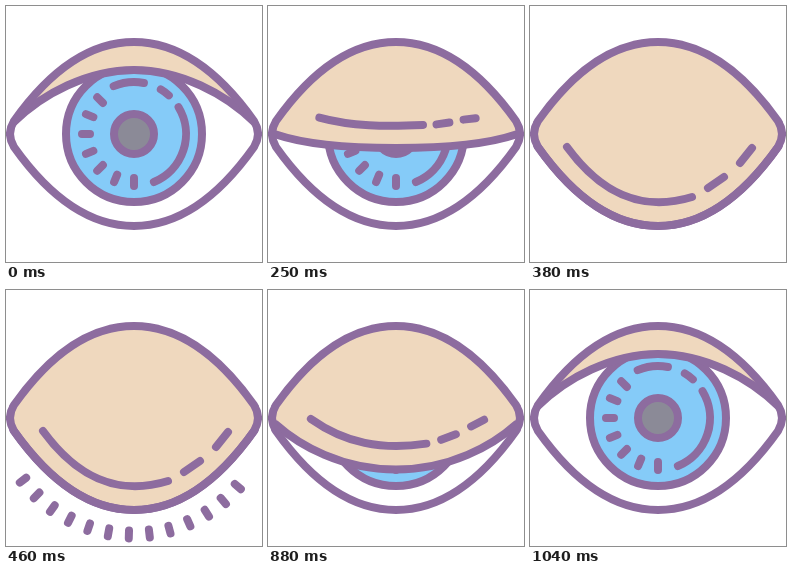
These frames come from a looping animation (256 px wide and 256 px high, 1180 ms). An HTML page:

```html
<!DOCTYPE html>
<html lang="en">
<head>
<meta charset="utf-8">
<title>Blinking eye</title>
<style>
html, body { margin: 0; width: 100%; height: 100%; overflow: hidden; background: #fff; }
svg { display: block; width: 100vw; height: 100vh; }
.line { fill: none; stroke: #8d6c9f; stroke-width: 8; stroke-linecap: round; stroke-linejoin: round; }
</style>
</head>
<body>
<svg viewBox="0 0 256 256">
  <circle class="line" cx="128" cy="128" r="68" style="fill:#85cbf8"/>
  <circle class="line" cx="128" cy="128" r="20" style="fill:#8b8a97"/>
  <path class="line" id="iris"/>
  <path id="lid" fill="#efd8be"/>
  <path class="line" id="rim"/>
  <path class="line" id="crease"/>
  <path class="line" id="outline"/>
  <path class="line" id="lashes"/>
</svg>
<script>
const LOOP = 1180;
const TICK = 1000 / 24;
const CLOSED = 6;     // step with the lid fully down
const LASHED = 8;     // step with the lashes fully out

const draw = (id, d) => document.getElementById(id).setAttribute('d', d);
const lerp = (a, b, k) => a + (b - a) * k;
const smooth = k => k * k * (3 - 2 * k);
const clamp = (v, lo, hi) => Math.max(lo, Math.min(hi, v));

const polar = (cx, cy, r, deg) => {
  const a = deg * Math.PI / 180;
  return [cx + r * Math.cos(a), cy + r * Math.sin(a)];
};
const spoke = (cx, cy, r0, r1, deg) =>
  `M${polar(cx, cy, r0, deg)}L${polar(cx, cy, r1, deg)}`;
const arc = (from, to) =>
  `M${polar(128, 128, 52, from)}A52 52 0 0 1 ${polar(128, 128, 52, to)}`;

// Left half of a curve, mirrored to the right: end, two controls, middle
const mirror = ([x, y]) => [256 - x, y];
const span = ([end, c1, c2, mid]) =>
  `${end}C${c1} ${c2} ${mid}C${mirror(c2)} ${mirror(c1)} ${mirror(end)}`;

const BOTTOM = [[8, 141], [30, 172], [71, 220], [128, 220]];
const TOP = BOTTOM.map(([x, y]) => [x, 256 - y]);

function drawIris() {
  let marks = arc(-113, -79) + arc(-59, -48) + arc(-31, 67.5);
  for (let deg = 90; deg <= 225; deg += 22.5) marks += spoke(128, 128, 44, 52, deg);
  draw('iris', marks);
}

function drawOutline() {
  draw('outline', `M${span(TOP)}Q256 128 248 141` +
    `M${span(BOTTOM)}M8 141Q0 128 8 115`);
}

function drawLid(k) {
  const open = [[8, 116], [36, 88], [82, 64], [128, 64]];
  const rim = open.map(([x, y], i) =>
    [lerp(x, BOTTOM[i][0], k), lerp(y, BOTTOM[i][1], k)]);
  rim[1][1] += 28 * k * (1 - k);   // the sides drop ahead of the middle
  draw('rim', 'M' + span(rim));
  draw('lid', `M${span(rim)}L252 128L248 115L8 115L4 128Z M${span(TOP)}L${span(rim)}Z`);
  draw('lid', `M${span(TOP)}L251 128L${mirror(rim[0])}` +
    `C${mirror(rim[1])} ${mirror(rim[2])} ${rim[3]}C${rim[2]} ${rim[1]} ${rim[0]}L5 128Z`);
}

// Open place, closed place, and how far the point runs ahead of the lid
const CREASE = [
  [78, 57, 37, 141, 0.6],
  [99, 48, 70, 186, 0.1],
  [123, 46, 110, 207, -0.15],
  [148, 47, 162, 191, 0],
  [158, 48, 178, 182, 0.1],
  [166, 50, 194, 171, 0.2],
  [176, 55, 210, 157, 0.3],
  [181, 57, 222, 142, 0.6]
];

function drawCrease(k, opacity) {
  const p = CREASE.map(([x0, y0, x1, y1, lead]) => {
    const q = k + lead * k * (1 - k);
    return [lerp(x0, x1, q), lerp(y0, y1, q)];
  });
  draw('crease', `M${p[0]}C${p[1]} ${p[2]} ${p[3]}M${p[4]}L${p[5]}M${p[6]}L${p[7]}`);
  document.getElementById('crease').style.opacity = opacity;
}

function drawLashes(length) {
  let d = '';
  for (let i = -6; length && i <= 6; i++) {
    d += spoke(127, 106, 134.5, 134.5 + length, 91.7 + i * 8.48);
  }
  draw('lashes', d);
}

function drawStep(step) {
  const k = smooth(Math.min(step / CLOSED, 1));
  drawLid(k);
  drawCrease(k, Math.min(step / 3, 1));
  drawLashes(Math.max(0, step - CLOSED) * 4);
}

// Closing starts on tick 4, opening on tick 18, one step per tick
function stepAt(ms) {
  const tick = Math.floor((ms + 5) / TICK);
  return clamp(tick < 18 ? tick - 3 : 25 - tick, 0, LASHED);
}

let shown = -1;
function play(now) {
  const step = stepAt(now % LOOP);
  if (step !== shown) drawStep(shown = step);
  requestAnimationFrame(play);
}

drawIris();
drawOutline();
play(performance.now());
</script>
</body>
</html>
```
